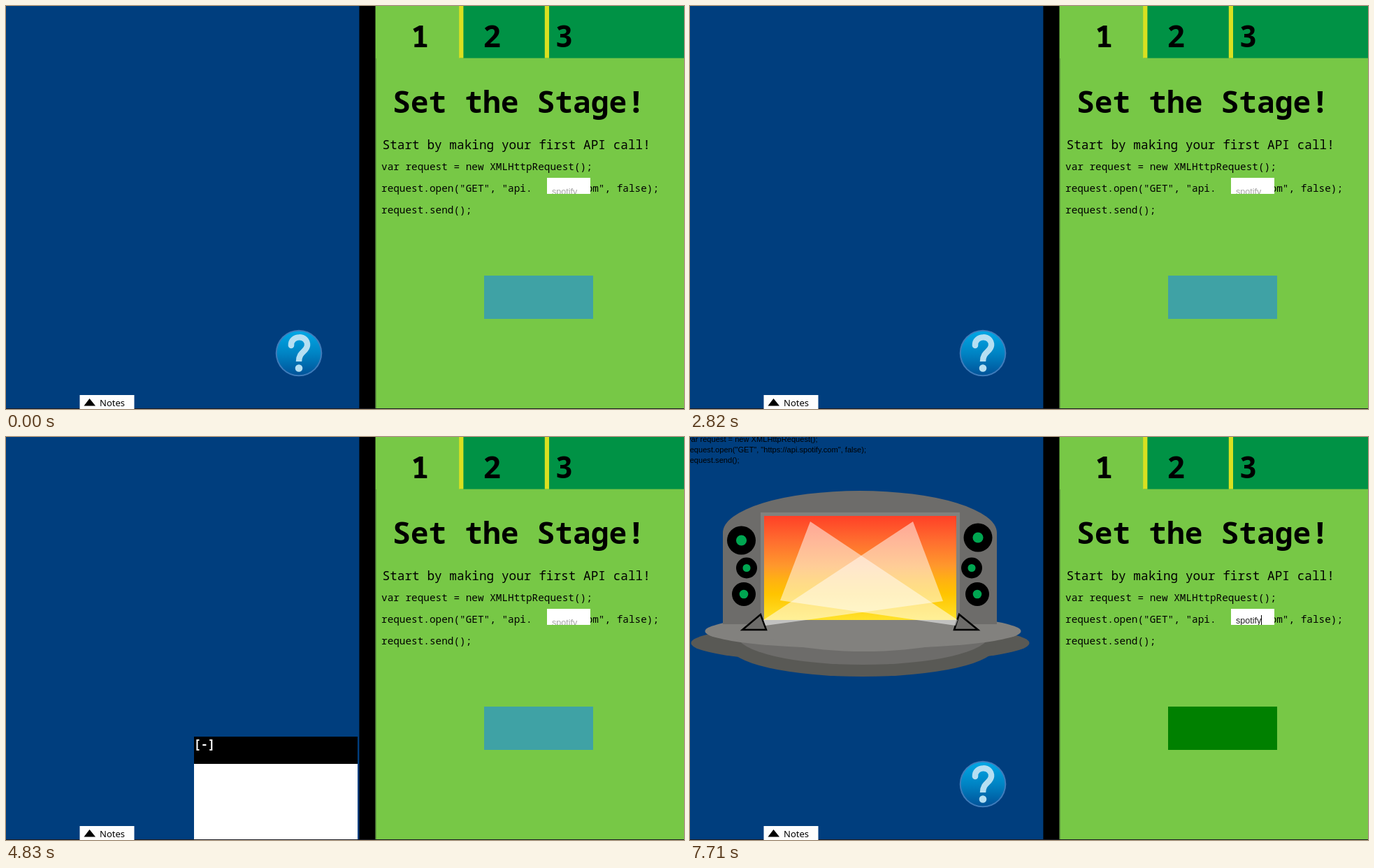
Write an HTML page with a canvas that moves like this. It is 970 px wide and 577 px high and loops after 8000 ms.

```html
<!DOCTYPE html>
<html lang="en">
<head>
<meta charset="utf-8">
<title>Set the Stage</title>
<style>
html, body { margin: 0; width: 100%; height: 100%; overflow: hidden; background: #003e7e; }
canvas { display: block; }
</style>
</head>
<body>
<canvas id="stage" width="970" height="577"></canvas>
<script>
const ctx = document.getElementById("stage").getContext("2d");
const LOOP = 8000, STEP = 30;
const PANEL_TOP = 425, FLOOR = 576, TRAVEL = 152;
const MONO = '"Noto Sans Mono", "DejaVu Sans Mono", monospace';
const SANS = '"Noto Sans", "Open Sans", sans-serif';
const ARIAL = '"Liberation Sans", Arial, sans-serif';

const clamp01 = v => Math.min(1, Math.max(0, v));
const easeOut = p => 1 - Math.pow(1 - p, 2.11);
const swing = p => 0.5 - Math.cos(p * Math.PI) / 2;

function rect(x, y, w, h, color) {
  ctx.fillStyle = color;
  ctx.fillRect(x, y, w, h);
}

function text(str, x, y, font, color = "#000") {
  ctx.font = font;
  ctx.fillStyle = color;
  ctx.fillText(str, x, y);
}

function ellipse(x, y, rx, ry, color) {
  ctx.beginPath();
  ctx.ellipse(x, y, rx, ry, 0, 0, Math.PI * 2);
  ctx.fillStyle = color;
  ctx.fill();
}

function polygon(points, fill, stroke) {
  ctx.beginPath();
  points.forEach(([x, y]) => ctx.lineTo(x, y));
  ctx.closePath();
  ctx.fillStyle = fill;
  ctx.fill();
  if (stroke) {
    ctx.strokeStyle = stroke;
    ctx.lineWidth = 2.5;
    ctx.stroke();
  }
}

function gradient(y0, y1, colors) {
  const g = ctx.createLinearGradient(0, y0, 0, y1);
  colors.forEach(([at, color]) => g.addColorStop(at, color));
  return g;
}

function drawLesson(done) {
  rect(0, 0, 970, 577, "#003e7e");
  rect(505.4, 0, 24, 577, "#000");
  rect(528.5, 0, 441.5, 577, "#77c846");
  rect(649, 0, 321, 74.6, "#009245");
  rect(648.2, 0, 6.2, 74.6, "#d9e021");
  rect(770.8, 0, 6.2, 74.6, "#d9e021");
  rect(528.5, 75, 1, 501, "#48683a");
  rect(0, 576, 970, 1, "#1c1c22");

  const big = "600 43px " + MONO;
  text("1", 579.5, 59, big);
  text("2", 682.5, 59, big);
  text("3", 785.5, 59, big);
  text("Set the Stage!", 553, 153, big);
  text("Start by making your first API call!", 538.5, 205, "500 17.75px " + MONO);

  const code = "500 14.38px " + MONO;
  text("var request = new XMLHttpRequest();", 537, 235, code);
  text('request.open("GET", "api.', 537, 266, code);
  text('com", false);', 822, 266, code);
  text("request.send();", 537, 297, code);

  rect(684, 386, 156, 62, done ? "#008000" : "#3fa2a5");
}

function drawInput(t) {
  const word = "spotify", font = "12.5px " + ARIAL;
  const keyTimes = [6030, 6210, 6360, 6510, 6660, 6780, 6900];
  const typed = word.slice(0, keyTimes.filter(k => t >= k).length);
  ctx.save();
  ctx.beginPath();
  ctx.rect(774, 246, 62, 23);
  ctx.clip();
  rect(774, 246, 62, 23, "#fff");
  if (typed) text(typed, 781, 266.5, font, "#222");
  else text(word, 781, 270, font, "#a5a5a5");
  if (t >= 5640 && !(t >= 7170 && t < 7710)) {
    ctx.font = font;
    rect(Math.round(781 + ctx.measureText(typed).width), 255, 1, 14, "#000");
  }
  ctx.restore();
}

function drawHelp() {
  ellipse(419, 497, 33.3, 33.3, "#3f7cbb");
  ellipse(419, 497, 31.3, 31.3, gradient(466, 528, [[0, "#00a7e5"], [0.5, "#0084c4"], [1, "#00549a"]]));
  ctx.strokeStyle = "#b5dff2";
  ctx.lineWidth = 8.5;
  ctx.beginPath();
  ctx.moveTo(408, 486);
  ctx.bezierCurveTo(407, 471, 432, 470, 431, 486);
  ctx.bezierCurveTo(430, 495, 419, 495, 419, 509);
  ctx.stroke();
  ellipse(408, 486, 4.25, 4.25, "#b5dff2");
  ellipse(419, 518.5, 5.3, 5.3, "#b5dff2");
}

function drawSpeaker(x, y, r) {
  ellipse(x, y, r, r, "#000");
  ellipse(x, y, r * 0.37, r * 0.37, "#00a651");
}

function drawConcert() {
  const dark = "#595955", light = "#82817e", body = "#6d6c6a";
  ellipse(243.5, 295, 242, 29, dark);
  ellipse(247, 300, 190, 43, dark);
  ellipse(247.5, 284, 180, 42, body);
  ellipse(247.5, 278, 226, 25, light);
  ellipse(249, 275, 150, 32, light);

  ctx.beginPath();
  ctx.ellipse(243, 137, 196, 60, 0, Math.PI, Math.PI * 2);
  ctx.lineTo(439, 268);
  ctx.lineTo(47, 268);
  ctx.fillStyle = body;
  ctx.fill();

  rect(101, 108, 285, 162, light);
  rect(106, 113, 275, 149, gradient(113, 262, [
    [0, "#ff4027"], [0.25, "#ff6f2f"], [0.48, "#ff982c"],
    [0.62, "#ffb211"], [0.75, "#ffc400"], [1, "#ffe22a"]
  ]));

  const lamp = points => polygon(points, body, "#000");
  lamp([[75, 276], [101, 254], [109, 276]]);
  lamp([[412, 276], [385, 254], [378, 276]]);
  const beam = "rgba(255,255,255,0.51)";
  polygon([[105, 262], [319, 121], [362, 235], [108, 270]], beam);
  polygon([[383, 262], [172, 121], [129, 234], [380, 270]], beam);

  drawSpeaker(73.5, 148, 20.5);
  drawSpeaker(81, 187.5, 15);
  drawSpeaker(77, 225, 17);
  drawSpeaker(412, 144, 20.5);
  drawSpeaker(403, 187.5, 15);
  drawSpeaker(411, 225, 17);

  const font = "11.1px " + ARIAL;
  text("var request = new XMLHttpRequest();", -4, 6.5, font);
  text('request.open("GET", "https://api.spotify.com", false);', -4, 21.5, font);
  text("request.send();", -4, 36.5, font);
}

// Top edge of a panel that rises with a soft stop and later drops.
function panelTop(t, openAt, openFor, closeAt, closeFor) {
  const shown = easeOut(clamp01((t - openAt) / openFor)) - swing(clamp01((t - closeAt) / closeFor));
  return Math.round(PANEL_TOP + TRAVEL * (1 - shown));
}

function drawNotes(t) {
  const font = "13px " + SANS;
  if (t < 1230 || t >= 2820) {
    rect(105.5, 557, 78, 20, "#fdfdfd");
    polygon([[111.5, 572.5], [119.5, 562], [128, 572.5]], "#000");
    text("Notes", 134, 572.5, font);
    return;
  }
  const top = panelTop(t, 1470, 615, 2512, 310);
  if (top >= FLOOR) return;
  ctx.save();
  ctx.beginPath();
  ctx.rect(105, top, 235, FLOOR - top);
  ctx.clip();
  rect(105.5, top, 233.5, FLOOR - top, "#fafafa");
  polygon([[111.5, top + 6], [128, top + 6], [119.5, top + 17]], "#000");
  text("Notes", 134, top + 16, font, "#222");
  ctx.restore();
}

function drawConsole(t) {
  const top = panelTop(t, 3510, 735, 4785, 455);
  if (top >= FLOOR) return;
  ctx.save();
  ctx.beginPath();
  ctx.rect(269, top, 234, FLOOR - top);
  ctx.clip();
  rect(269, top, 234, FLOOR - top, "#fff");
  rect(269, top, 234, 39, "#000");
  text("[-]", 268.5, top + 17, "bold 17px " + MONO, "#fff");
  ctx.restore();
}

function render(now) {
  const t = Math.floor((now % LOOP) / STEP) * STEP;
  const done = t >= 7290;
  drawLesson(done);
  drawInput(t);
  if (done) drawConcert();
  drawHelp();
  drawNotes(t);
  drawConsole(t);
}

let start;
function tick(now) {
  start ??= now;
  render(Math.max(0, now - start));
  requestAnimationFrame(tick);
}
render(0);
requestAnimationFrame(tick);
</script>
</body>
</html>
```
